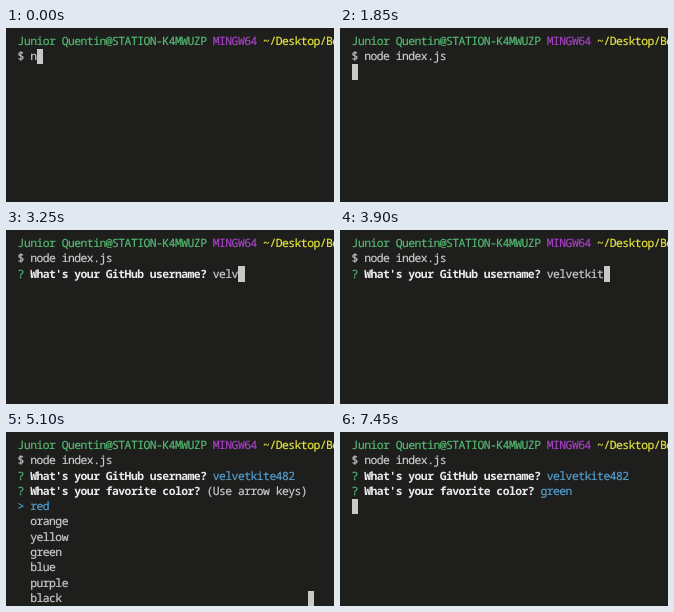
Recreate the animation shown at these times as an HTML page. Size 328 by 174 pixels, loop 8 s.

```html
<!DOCTYPE html>
<html lang="en">
<head>
<meta charset="utf-8">
<title>Terminal prompt</title>
<style>
  html, body { margin: 0; width: 100%; height: 100%; overflow: hidden; background: #1e1f1d; }
  #term {
    --cw: 6.3px;
    --lh: 15.3px;
    position: absolute; inset: 0;
    overflow: hidden; contain: strict;
    font: 11.4px/15.3px "Noto Sans Mono", "DejaVu Sans Mono", monospace;
    letter-spacing: calc(var(--cw) - 0.6em);
    font-variant-ligatures: none;
    text-rendering: geometricPrecision;
    -webkit-text-stroke: 0.2px;
    white-space: pre;
    color: #cccccc;
  }
  #screen { position: absolute; left: 11.6px; top: 6px; }
  .row { height: var(--lh); }
  .green { color: #55b972; }
  .purple { color: #a541c2; }
  .yellow { color: #e6e63c; }
  .blue { color: #559fd0; }
  .bold { color: #ececec; font-weight: 700; -webkit-text-stroke: 0; }
  #cursor {
    position: absolute;
    width: var(--cw); height: var(--lh);
    background: #c8c8c6;
  }
</style>
</head>
<body>
<div id="term"><div id="screen"></div><div id="cursor"></div></div>
<script>
const LOOP = 8000, LEFT = 11.8, TOP = 5.7, CW = 6.3, LH = 15.3;
const COMMAND = 'node index.js', USER = 'velvetkite482';
const COLORS = ['red', 'orange', 'yellow', 'green', 'blue', 'purple', 'black'];
const COMMAND_KEYS = [0, 50, 150, 250, 350, 450, 550, 650, 750, 900, 1000, 1100, 1200];
const USER_KEYS = [2900, 3000, 3150, 3250, 3400, 3500, 3650, 3750, 3900, 4050, 4200, 4350, 4500];
const ARROW_KEYS = [6200, 6350, 6650];
const RUN = 1750, ASK_USER = 2000, ASK_COLOR = 4600, DONE = 7100;

const screen = document.getElementById('screen');
const cursor = document.getElementById('cursor');

const pressed = (keys, t) => keys.filter(k => k <= t).length;
const span = (cls, text) => `<span class="${cls}">${text}</span>`;
const ask = text => span('green', '?') + ' ' + span('bold', text) + ' ';

const HEADER = span('green', 'Junior Quentin@STATION-K4MWUZP') + ' ' +
  span('purple', 'MINGW64') + ' ' + span('yellow', '~/Desktop/Bo');

// Terminal contents and cursor cell at time t
function stateAt(t) {
  const typed = COMMAND.slice(0, pressed(COMMAND_KEYS, t));
  const rows = [HEADER, '$ ' + typed];
  if (t < RUN) return { rows, col: 2 + typed.length, row: 1 };
  if (t < ASK_USER) return { rows, col: 0, row: 2 };

  const name = USER.slice(0, pressed(USER_KEYS, t));
  const answered = t >= ASK_COLOR;
  rows.push(ask("What's your GitHub username?") + (answered ? span('blue', name) : name));
  if (!answered) return { rows, col: 31 + name.length, row: 2 };

  const pick = pressed(ARROW_KEYS, t);
  const question = ask("What's your favorite color?");
  if (t >= DONE) {
    rows.push(question + span('blue', COLORS[pick]));
    return { rows, col: 0, row: 4 };
  }
  rows.push(question + (pick ? '' : '(Use arrow keys)'));
  COLORS.forEach((c, i) => rows.push(i === pick ? span('blue', '&gt; ' + c) : '  ' + c));
  return { rows, col: pick ? 30 : 46, row: 10 };
}

let shown = '';
function draw(t) {
  const { rows, col, row } = stateAt(t);
  const html = rows.map(r => `<div class="row">${r}</div>`).join('');
  if (html !== shown) screen.innerHTML = shown = html;
  cursor.style.left = LEFT + col * CW + 'px';
  cursor.style.top = TOP + row * LH + 'px';
}

const start = performance.now();
function tick() {
  draw((performance.now() - start) % LOOP);
  requestAnimationFrame(tick);
}
tick();
</script>
</body>
</html>
```
